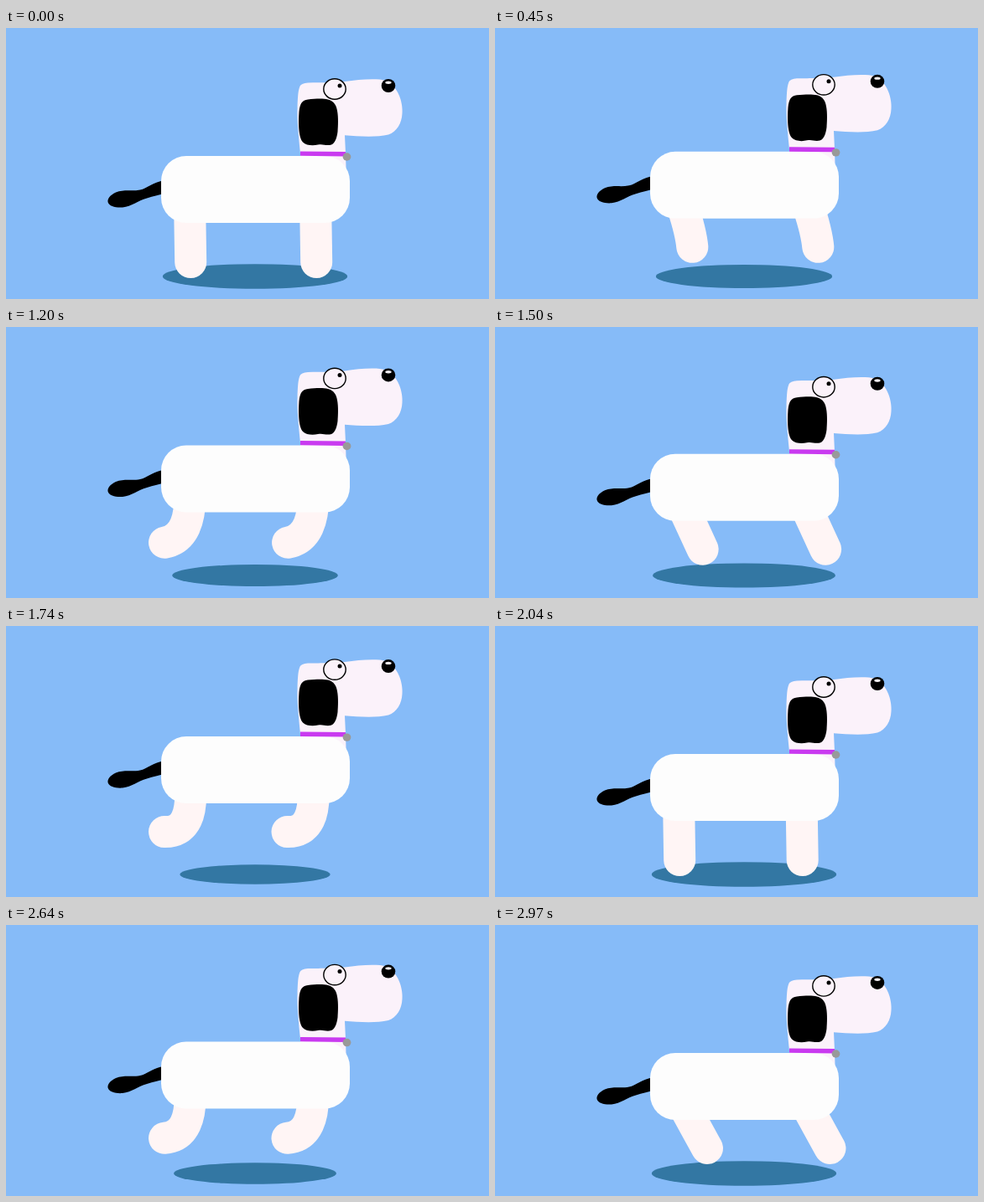
An HTML page that plays this animation: 576 px wide and 324 px high, repeating every 3 s.

```html
<!DOCTYPE html>
<html lang="en">
<head>
<meta charset="utf-8">
<title>Running dog</title>
<style>
  html, body { margin: 0; width: 100%; height: 100%; overflow: hidden; background: #86bbf8; }
  svg { display: block; width: 100vw; height: 100vh; }
  .leg { fill: none; stroke: #fff5f5; stroke-width: 38; stroke-linecap: round; }
</style>
</head>
<body>
<svg viewBox="0 0 576 324">
  <rect width="576" height="324" fill="#86bbf8"/>
  <ellipse id="shadow" cx="297" cy="297" fill="#3377a3"/>
  <g id="dog">
    <path d="M188 182.500C177 183.500 168 192 160 193.500C150 195.500 141 192.500 131 196.500C124 200 121 204 121.500 208C123 213.500 131 215 139 214.500C150 213.500 157 206.500 168 203.500C176 201 182 200 188 198Z"/>
    <path class="leg" id="rear"/>
    <path class="leg" id="front"/>
    <path fill="#fbf2fa" d="M351 185V150C349 130 347 110 347.500 95C348 84 348 77 350 71C351 67 355 66 360 65.500C372 65 384 66 404 64C418 62 432 60.500 446 61.500C458 63 465 71 469 81C472 88 473 97 472.500 102C472 114 466 124 456 127.500C441 131 420 129.500 404 128.200L405 150L406 185Z"/>
    <rect x="185" y="153" width="225" height="80" rx="30" fill="#fdfdfd"/>
    <path fill="#c93af0" d="M351 147.500L405 148V153.500L351 152.800Z"/>
    <ellipse cx="406.500" cy="154" rx="4.900" ry="4.700" fill="#999"/>
    <path d="M349.500 100C350.500 91 353 86 360 85.500C369 84.500 378 84 384 85.500C391 87.500 394 92 395 99C396.500 107 396 117 395.500 124C394.500 132 392 139.500 386 140C380 140.500 378 138.500 372 139.500C366 141 358 140.500 354 136.500C349 131 348.500 114 349.500 100Z"/>
    <ellipse cx="392" cy="73" rx="13.200" ry="12.200" fill="#fbf2fa" stroke="#000" stroke-width="1.400"/>
    <circle cx="398" cy="69" r="2.500"/>
    <ellipse cx="456" cy="69" rx="8.300" ry="8"/>
    <ellipse cx="456" cy="65.300" rx="3.700" ry="1.700" fill="#f4f0f4"/>
  </g>
</svg>
<script>
const STEP = 30, STEPS = 100, CYCLE = 16;
// Steps at which a stride starts; the dog settles into an even run.
const strides = [0, 19.1, 36.5, 52, 68, 84, 100];

const [dog, shadow, rear, front] =
  ["dog", "shadow", "rear", "front"].map(id => document.getElementById(id));

const clamp = v => Math.min(1, Math.max(0, v));
const ease = v => Math.sin(clamp(v) * Math.PI / 2) ** 2;

function phaseAt(step) {
  const i = strides.findLastIndex(s => s <= step);
  return CYCLE * (step - strides[i]) / (strides[i + 1] - strides[i]);
}

function leg(node, hip, foot, knee) {
  const y = 205;
  node.setAttribute("d",
    `M${hip} ${y}Q${hip + knee.x} ${y + knee.y} ${hip + foot.x} ${y + foot.y}`);
}

function draw(now) {
  const step = Math.floor(now / STEP) % STEPS, p = phaseAt(step);

  // Quick rise, slower fall.
  const lift = -22 * Math.min(ease(p / 7), ease((15.2 - p) / 8.2));

  // The foot kicks back from below the hip, curls, then swings forward.
  const reach = p < 7 ? 0.48 * clamp(1 - p / 3) ** 2 : ease((p - 7) / 8.7);
  const curl = Math.min(ease(p / 5), ease((14.5 - p) / 5.5));
  const foot = { x: -30 + 65 * reach, y: 62 + 13 * ease(1 - p / 5) };
  const knee = { x: foot.x / 2 + 22 * curl, y: foot.y / 2 + 32 * curl };

  // The front leg drifts slightly back early in the run.
  const gap = 150 - 3.5 * clamp((step - 15) / 30);

  dog.setAttribute("transform", `translate(0 ${lift})`);
  leg(rear, 219, foot, knee);
  leg(front, 219 + gap, foot, knee);
  shadow.setAttribute("rx", 110.2 + lift * 0.985);
  shadow.setAttribute("ry", 14.8 + lift * 0.147);
}

const start = performance.now();
function tick() {
  draw(performance.now() - start);
  requestAnimationFrame(tick);
}
tick();
</script>
</body>
</html>
```
